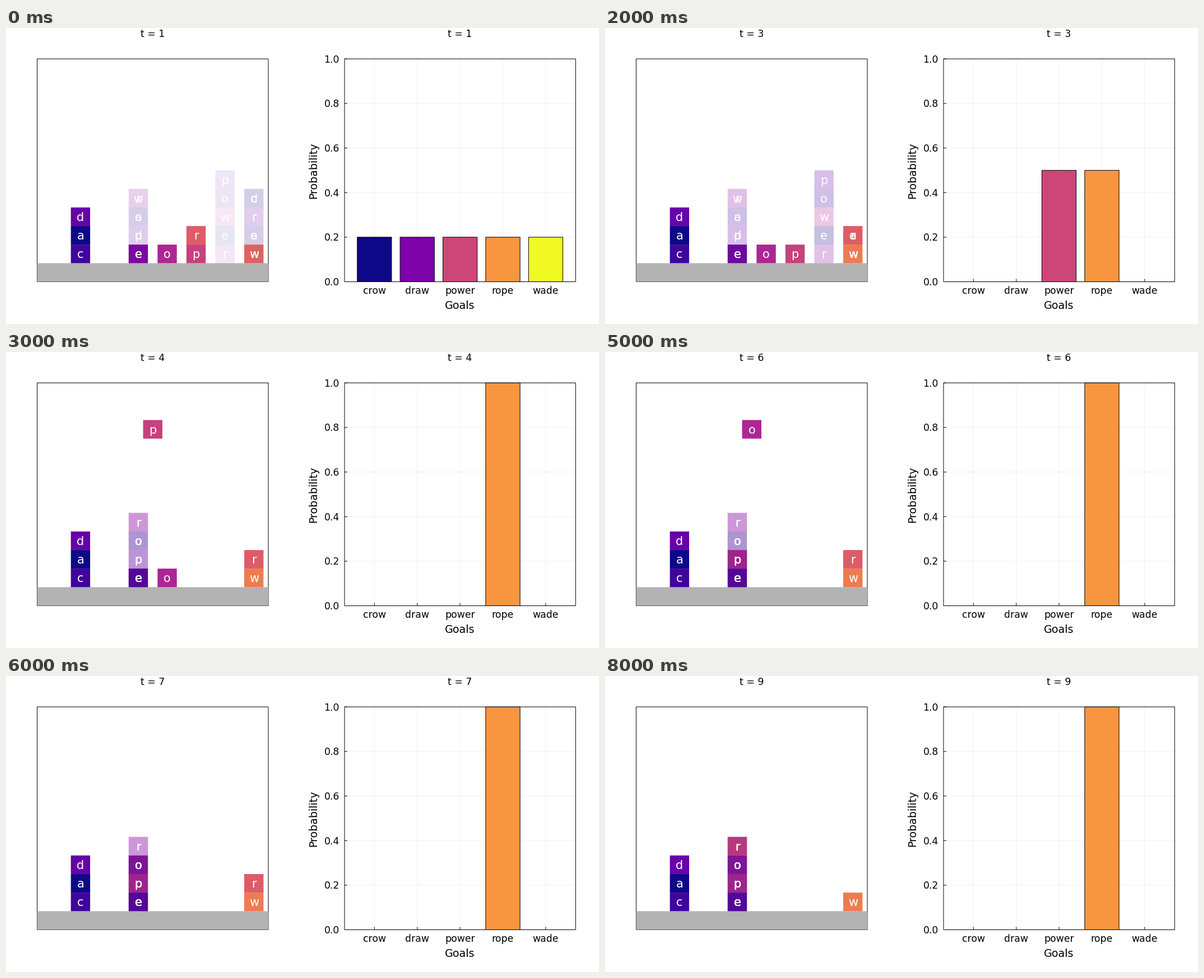
A matplotlib script for the animation above (9000 ms loop, 1058 px wide and 529 px high).

```python
import matplotlib.pyplot as plt
from matplotlib.animation import FuncAnimation
from matplotlib.patches import Rectangle

W, H, DPI = 1058, 529, 100
PX = 72 / DPI
STEPS = 9

TOP, BOTTOM = 55.2, 453.5
LEFT, RIGHT = 55.6, 468.0          # block scene
P_LEFT, P_RIGHT = 604.0, 1016.3    # bar chart
COL = (RIGHT - LEFT) / 8
ROW = (BOTTOM - TOP) / 12

plasma = plt.get_cmap("plasma")
plt.rcParams["font.family"] = "DejaVu Sans"

# goal word -> column where its tower is built
GOALS = {"crow": 7, "draw": 7, "power": 6, "rope": 3, "wade": 3}
START = {"c": (1, 1), "a": (1, 2), "d": (1, 3), "e": (3, 1),
         "o": (4, 1), "p": (5, 1), "r": (5, 2), "w": (7, 1)}
HAND = (3.5, 9)
# (time step, block, new place)
MOVES = [(2, "r", HAND), (3, "r", (7, 2)), (4, "p", HAND), (5, "p", (3, 2)),
         (6, "o", HAND), (7, "o", (3, 3)), (8, "r", HAND), (9, "r", (3, 4))]

fig = plt.figure(figsize=(W / DPI, H / DPI), dpi=DPI, facecolor="white")
ax = fig.add_axes([0, 0, 1, 1])
ax.set_xlim(0, W)
ax.set_ylim(H, 0)
ax.axis("off")


def label(x, y, s, size, **kw):
    style = dict(ha="center", va="baseline", color="black", fontsize=size * PX)
    style.update(kw)
    return ax.text(x, y, s, **style)


def line(x0, y0, x1, y1, **kw):
    ax.plot([x0, x1], [y0, y1], color="black", lw=PX,
            solid_capstyle="butt", snap=False, **kw)


def rect(x, y, w, h, **kw):
    return ax.add_patch(Rectangle((x, y), w, h, snap=False, **kw))


def frame(x0, x1):
    rect(x0, TOP, x1 - x0, BOTTOM - TOP, fill=False, ec="black", lw=PX,
         zorder=2.5)


def bar_x(i):
    return 657.3 + 76.4 * i


def draw_static():
    frame(LEFT, RIGHT)
    rect(LEFT, BOTTOM - ROW, RIGHT - LEFT, ROW, fc="#b3b3b3", lw=0, zorder=3)
    frame(P_LEFT, P_RIGHT)
    for i, word in enumerate(GOALS):
        x = bar_x(i)
        line(x, TOP, x, BOTTOM, alpha=0.06, zorder=1)
        line(x, BOTTOM, x, BOTTOM - 5, zorder=2)
        label(x, 475, word, 17.2)
    for k in range(6):
        y = BOTTOM - (BOTTOM - TOP) * k / 5
        line(P_LEFT, y, P_RIGHT, y, alpha=0.06, zorder=1)
        line(P_LEFT, y, P_LEFT + 5, y, zorder=2)
        label(594.8, y + 6.4, f"{k / 5:.1f}", 17.2, ha="right")
    label(810, 502.5, "Goals", 19.2)
    label(554, 255, "Probability", 19, rotation=90, rotation_mode="anchor")


def particles(t):
    """Weighted goal guesses; the set collapses onto one word at step 4."""
    if t == 1:
        return [(word, 0.2) for word in GOALS]
    if t <= 3:
        return [(word, 0.5 * (word in ("power", "rope"))) for word in GOALS]
    return [("rope", 0.2)] * len(GOALS)


def block(place, letter, rank, alpha=1.0):
    cx = LEFT + (place[0] + 0.5) * COL
    y = BOTTOM - (place[1] + 1) * ROW
    return [rect(cx - COL / 3, y, COL * 2 / 3, ROW, fc=plasma(0.096 * rank),
                 lw=0, alpha=alpha, zorder=4),
            label(cx, y + ROW / 2 + 7.6, letter, 21, color="white", zorder=5)]


draw_static()
titles = [label(x, 16, "", 17.4) for x in (262, 810)]
bars = [rect(bar_x(i) - 30.6, BOTTOM, 61.2, 0, fc=plasma(i / 4), ec="black",
             lw=PX, zorder=3) for i in range(len(GOALS))]
live = []


def update(n):
    t = n + 1
    while live:
        live.pop().remove()
    for title in titles:
        title.set_text(f"t = {t}")

    places = dict(START)
    for when, letter, place in MOVES:
        if when <= t:
            places[letter] = place
    for rank, letter in enumerate(sorted(places)):
        live.extend(block(places[letter], letter, rank))

    chance = dict.fromkeys(GOALS, 0)
    for word, weight in particles(t):
        chance[word] += weight
        order = sorted(word)
        for row, letter in enumerate(reversed(word), 1):
            live.extend(block((GOALS[word], row), letter,
                              order.index(letter), weight / 2))

    for bar, p in zip(bars, chance.values()):
        height = p * (BOTTOM - TOP)
        bar.set_y(BOTTOM - height)
        bar.set_height(height)
    return titles + bars + live


anim = FuncAnimation(fig, update, frames=STEPS, init_func=lambda: update(0),
                     interval=1000, repeat=True, repeat_delay=0, blit=False)
plt.show()
```
